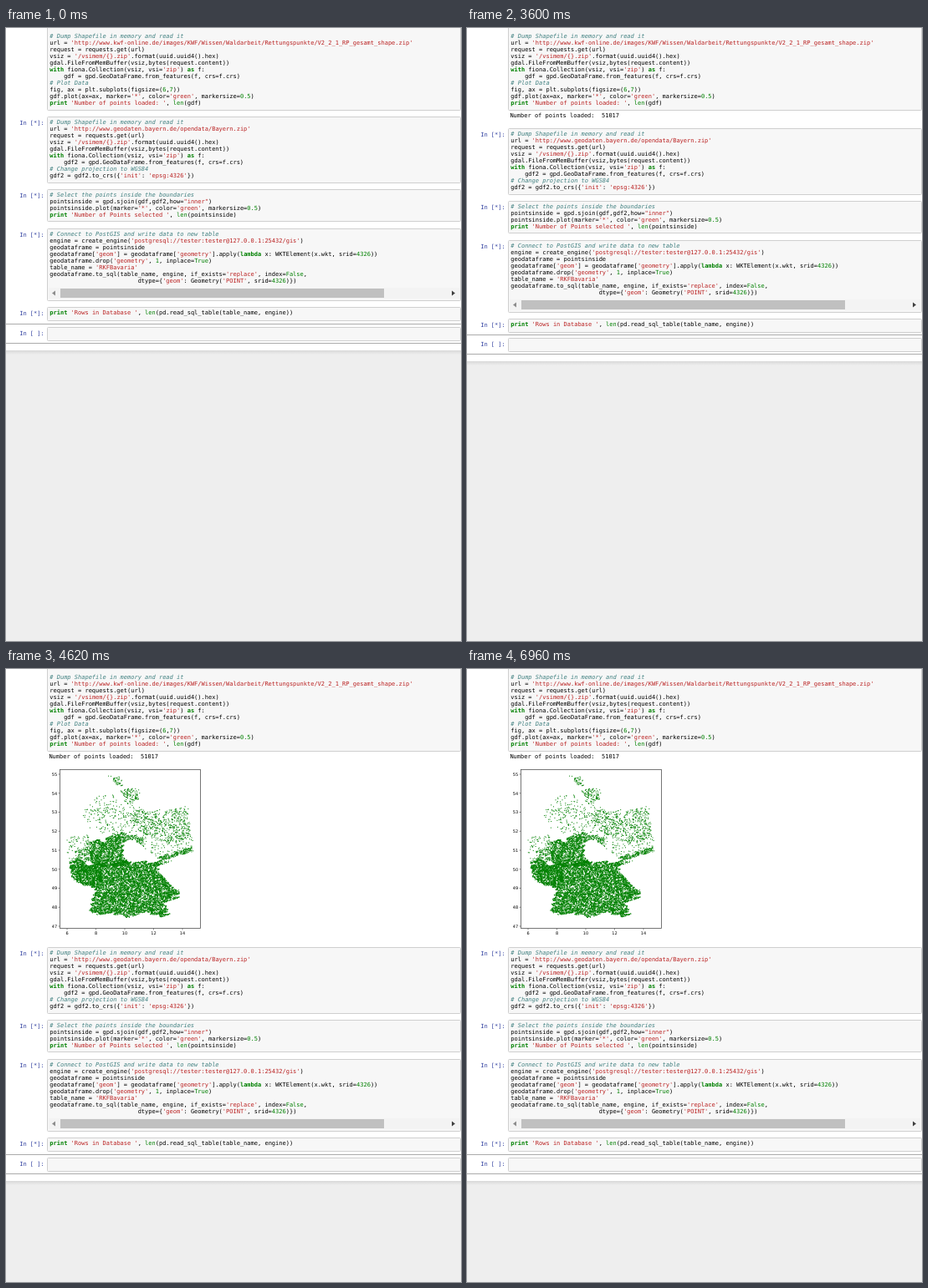
Animation of 544x734 px, one loop 8 s. Source, as an HTML page with a canvas:

```html
<!DOCTYPE html>
<html lang="en">
<head>
<meta charset="utf-8">
<title>Notebook run</title>
<style>
html, body { margin: 0; width: 100%; height: 100%; overflow: hidden; background: #eee; }
svg, canvas { position: absolute; left: 0; top: 0; }
text { font: 7px "DejaVu Sans Mono", monospace; white-space: pre; text-rendering: geometricPrecision; fill: #000; }
.axis text { font: 5px "DejaVu Sans", sans-serif; }
.box { fill: #f7f7f7; stroke: #cfcfcf; }
.prompt { fill: #303f9f; }
.comment { fill: #408080; font-style: italic; }
.string { fill: #ba2121; }
.keyword { fill: #008000; font-weight: bold; }
.literal { fill: #008000; }
#cells { animation: push 8s step-end infinite; }
#tail { animation: pushTail 8s step-end infinite; }
#output { animation: showOutput 8s step-end infinite; }
.plot { animation: showPlot 8s step-end infinite; }
@keyframes push {
  0% { transform: none; }
  45% { transform: translateY(14px); }
  46.25%, 100% { transform: translateY(227px); }
}
@keyframes pushTail {
  0% { transform: none; }
  45% { transform: translateY(13px); }
  46.25%, 100% { transform: translateY(227px); }
}
@keyframes showOutput { 0% { visibility: hidden; } 45%, 100% { visibility: visible; } }
@keyframes showPlot { 0% { visibility: hidden; } 46.25%, 100% { visibility: visible; } }
</style>
</head>
<body>
<svg width="544" height="734" viewBox="0 0 544 734">
  <defs>
    <linearGradient id="shade" x2="0" y2="1">
      <stop stop-color="#d8d8d8"/><stop offset="1" stop-color="#eee"/>
    </linearGradient>
  </defs>
  <g id="tail">
    <rect y="-400" width="544" height="786" fill="#fff"/>
    <rect y="386" width="544" height="5" fill="url(#shade)"/>
    <path d="M0 354.5H544M0 377.5H544" stroke="#ababab"/>
  </g>
  <g id="first"></g>
  <text id="output" x="51.4" y="107.3">Number of points loaded:  51017</text>
  <g id="cells"></g>
  <g class="plot axis" id="axis"><rect x="64.5" y="120.5" width="168" height="190" fill="#fff" stroke="#555" stroke-width=".8"/></g>
</svg>
<canvas class="plot" id="map" width="544" height="734"></canvas>
<script>
const byId = id => document.getElementById(id);
const LINE = 8;
const TOKEN = /(#.*)|('[^']*'|"[^"]*")|\b(print|with|as|lambda)\b|\b(len|True|False|\d+(?:\.\d+)?)\b/g;
const STYLES = ['comment', 'string', 'keyword', 'literal'];

const highlight = line => line.replace(TOKEN, (token, ...groups) =>
  `<tspan class="${STYLES[groups.slice(0, 4).findIndex(Boolean)]}">${token}</tspan>`);

function addCell(parent, top, height, baseline, code, prompt) {
  const label = prompt ? `<text class="prompt" x="16.2" y="${baseline + .6}">In [${prompt}]:</text>` : '';
  const lines = code.split('\n').map((line, i) =>
    `<text x="52.3" y="${baseline + i * LINE}">${highlight(line)}</text>`);
  byId(parent).insertAdjacentHTML('beforeend',
    `<rect class="box" x="49.5" y="${top}" width="494" height="${height}" rx="1"/>${label}${lines.join('')}`);
}

addCell('first', -5.5, 104, 12.3, `# Dump Shapefile in memory and read it
url = 'http://www.kwf-online.de/images/KWF/Wissen/Waldarbeit/Rettungspunkte/V2_2_1_RP_gesamt_shape.zip'
request = requests.get(url)
vsiz = '/vsimem/{}.zip'.format(uuid.uuid4().hex)
gdal.FileFromMemBuffer(vsiz,bytes(request.content))
with fiona.Collection(vsiz, vsi='zip') as f:
    gdf = gpd.GeoDataFrame.from_features(f, crs=f.crs)
# Plot Data
fig, ax = plt.subplots(figsize=(6,7))
gdf.plot(ax=ax, marker='*', color='green', markersize=0.5)
print 'Number of points loaded: ', len(gdf)`);

addCell('cells', 106.5, 79, 115.3, `# Dump Shapefile in memory and read it
url = 'http://www.geodaten.bayern.de/opendata/Bayern.zip'
request = requests.get(url)
vsiz = '/vsimem/{}.zip'.format(uuid.uuid4().hex)
gdal.FileFromMemBuffer(vsiz,bytes(request.content))
with fiona.Collection(vsiz, vsi='zip') as f:
    gdf2 = gpd.GeoDataFrame.from_features(f, crs=f.crs)
# Change projection to WGS84
gdf2 = gdf2.to_crs({'init': 'epsg:4326'})`, '*');

addCell('cells', 193.5, 38, 202.3, `# Select the points inside the boundaries
pointsinside = gpd.sjoin(gdf,gdf2,how="inner")
pointsinside.plot(marker='*', color='green', markersize=0.5)
print 'Number of Points selected ', len(pointsinside)`, '*');

addCell('cells', 240.5, 86, 249.3, `# Connect to PostGIS and write data to new table
engine = create_engine('postgresql://tester:tester@127.0.0.1:25432/gis')
geodataframe = pointsinside
geodataframe['geom'] = geodataframe['geometry'].apply(lambda x: WKTElement(x.wkt, srid=4326))
geodataframe.drop('geometry', 1, inplace=True)
table_name = 'RKFBavaria'
geodataframe.to_sql(table_name, engine, if_exists='replace', index=False,
                         dtype={'geom': Geometry('POINT', srid=4326)})`, '*');

// Horizontal scrollbar
byId('cells').insertAdjacentHTML('beforeend', `
  <rect x="51" y="311" width="491" height="13" fill="#f3f3f3"/>
  <rect x="65" y="312" width="387" height="11" fill="#c0c0c0"/>
  <path d="M59 314.5v6l-4-3z" fill="#8c8c8c"/><path d="M533 314.5v6l4-3z" fill="#404040"/>`);

addCell('cells', 334.5, 16, 343.3, `print 'Rows in Database ', len(pd.read_sql_table(table_name, engine))`, '*');
addCell('tail', 358.5, 16, 367.7, '', ' ');

// Axes
const lonX = lon => 73 + (lon - 6) * 17.25;
const latY = lat => 126 + (55 - lat) * 22.75;
let ticks = '', labels = '';
for (let lat = 47; lat <= 55; lat++) {
  ticks += `M62.5 ${latY(lat)}h2`;
  labels += `<text x="61.2" y="${latY(lat) + 1.9}" text-anchor="end">${lat}</text>`;
}
for (let lon = 6; lon <= 14; lon += 2) {
  ticks += `M${lonX(lon)} 310.5v2`;
  labels += `<text x="${lonX(lon)}" y="318" text-anchor="middle">${lon}</text>`;
}
byId('axis').insertAdjacentHTML('beforeend', `<path d="${ticks}" stroke="#444" stroke-width=".6"/>${labels}`);

// Scatter map: outline and dots per square pixel
const REGIONS = [
  ['76,234 90,228 98,236 112,231 116,246 110,262 94,259 80,252', 2.7],
  ['101,210 108,203 117,207 127,198 139,194 145,203 139,211 140,224 148,233 112,238 100,230', 1.9],
  ['112,234 146,230 183,232 181,241 200,262 208,266 206,272 189,280 195,292 186,296 164,291 148,299 135,293 100,293 104,274 110,258', 2],
  ['74,231 88,215 103,206 104,232 88,232', .75],
  ['73,199 97,198 104,205 92,211 73,222', .16],
  ['174,234 194,220 224,213 222,218 200,227 184,234', 1.4],
  ['141,197 166,203 165,214 157,206 145,205', .9],
  ['152,166 176,172 216,163 219,184 224,206 196,209 168,199 152,190', .42],
  ['92,172 106,152 128,150 160,165 172,200 165,206 145,203 120,197 96,190', .13],
  ['162,204 200,206 224,208 222,215 180,224 166,216', .1],
  ['122,128 137,129 140,141 131,138', .55],
  ['137,145 158,143 160,157 146,160', .6]
];

let seed = 51017;
const random = () => (seed = seed * 16807 % 2147483647) / 2147483647;
const clump = (x, y) => Math.sin(x * .9 + 2 * Math.sin(y * .5)) * Math.sin(y * .8 + 2 * Math.sin(x * .4));
const ctx = byId('map').getContext('2d');
ctx.fillStyle = '#008000';

for (const [outline, density] of REGIONS) {
  const points = outline.split(' ').map(p => p.split(',').map(Number));
  const shape = new Path2D(`M${outline}z`);
  const [xs, ys] = [0, 1].map(i => points.map(p => p[i]));
  const left = Math.min(...xs), top = Math.min(...ys);
  const width = Math.max(...xs) - left, height = Math.max(...ys) - top;
  for (let n = width * height * density; n > 0; n--) {
    const x = left + random() * width, y = top + random() * height;
    const wobble = 1.5 * Math.sin(y * 1.1 + x * .3);
    if (random() < .72 + .5 * clump(x, y) && ctx.isPointInPath(shape, x + wobble, y + wobble))
      ctx.fillRect(x - .5, y - .5, 1, 1);
  }
}
</script>
</body>
</html>
```
